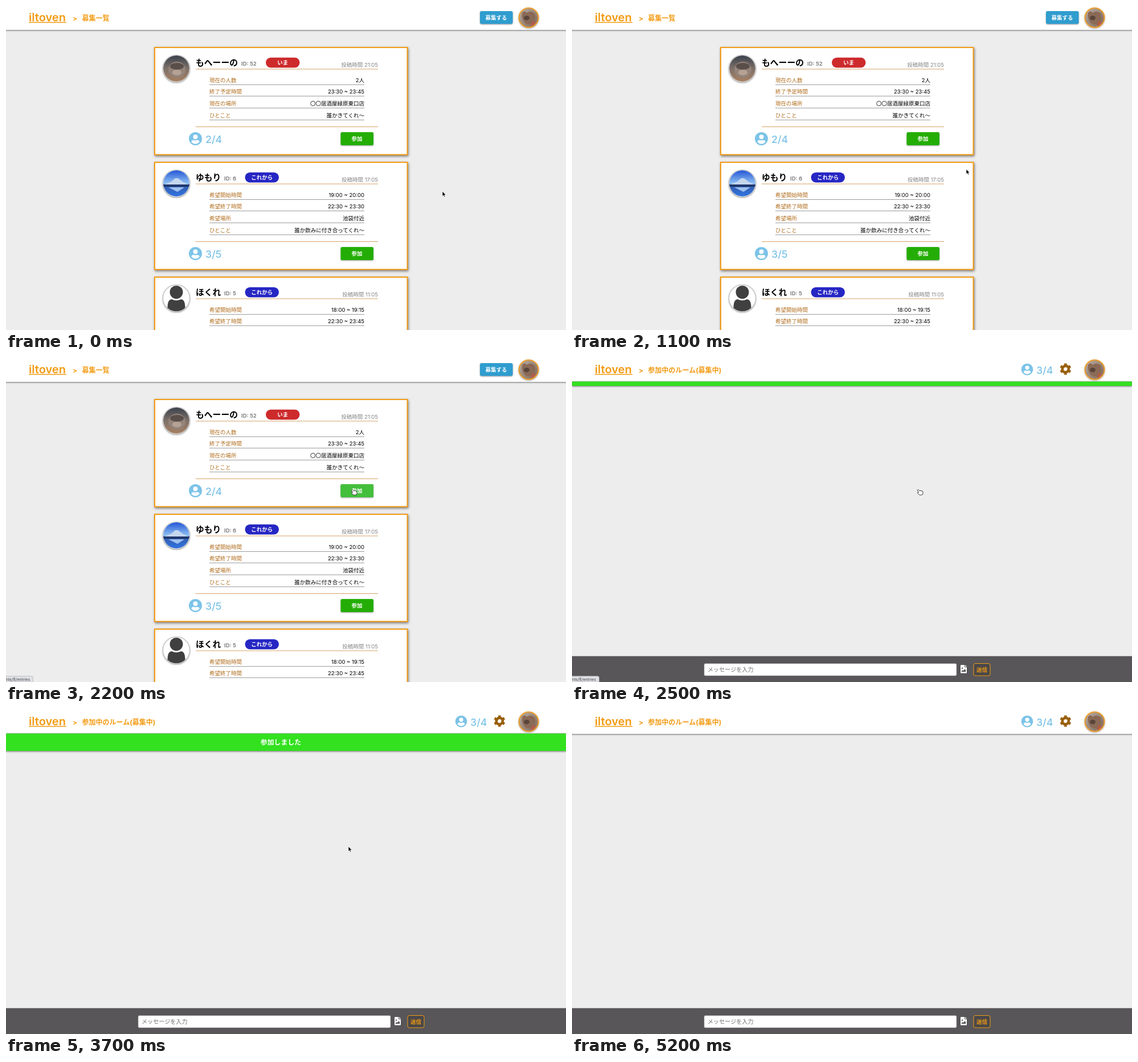
Write an HTML page that moves like this. It is 983 by 570 pixels and loops after 5300 ms.

```html
<!DOCTYPE html>
<html lang="ja">
<head>
<meta charset="utf-8">
<title>募集一覧</title>
<style>
  html, body { margin: 0; width: 100%; height: 100%; overflow: hidden; background: #ededed; }
  svg { position: absolute; left: 0; top: 0; display: block; }
  svg, .flash { font: 9.5px Inter, "Noto Sans CJK JP", sans-serif; }
  .list, .room, .flash, .hover, .status, .arrow, .hand, .cursor { animation: 5.3s step-end infinite; }

  .b { font-weight: 700; }
  .mid { text-anchor: middle; }
  .end { text-anchor: end; }
  .white { fill: #fff; }
  .title { font-size: 12px; font-weight: 700; fill: #f39b13; }
  .logo { font-size: 20px; font-weight: 600; fill: #f39b13; }
  .name { font-size: 14.8px; font-weight: 700; }
  .count { font-size: 17.8px; font-weight: 500; fill: #7cc3e8; }
  .label { font-weight: 500; fill: #b06c1c; }
  .gray { fill: #858585; }
  .rule { stroke: #d6a268; }
  .row { stroke: #9c9c9c; }
  .frame { fill: #fff; stroke: #f39b13; stroke-width: 2; filter: drop-shadow(1px 2px 2px rgba(0,0,0,.5)); }
  .btn { filter: drop-shadow(0 1px 1px rgba(0,0,0,.4)); }
  .go { fill: #24ad06; }
  .bar { fill: #fff; filter: drop-shadow(0 1px 1.5px rgba(0,0,0,.55)); }

  .flash {
    position: absolute; left: 0; top: 41px; width: 983px; overflow: hidden;
    border-top: 1px dotted #999; background: #33e11f; box-shadow: 0 1px 3px rgba(0,0,0,.55);
    color: #fff; font-size: 11.9px; font-weight: 700; line-height: 30px; text-align: center;
    text-indent: -18px; animation-name: flash;
  }
  .list { animation-name: list; }
  .room { animation-name: room; }
  .hover, .status, .hand { animation-name: over; }
  .arrow { animation-name: away; }
  .cursor { animation-name: move; }

  @keyframes list { 0% { visibility: visible } 45.28%, 100% { visibility: hidden } }
  @keyframes room { 0% { visibility: hidden } 45.28%, 100% { visibility: visible } }
  @keyframes over { 0% { opacity: 0 } 35.84% { opacity: 1 } 52.83%, 100% { opacity: 0 } }
  @keyframes away { 0% { opacity: 1 } 35.84% { opacity: 0 } 52.83%, 100% { opacity: 1 } }
  @keyframes flash {
    0% { height: 0; visibility: hidden }
    47.16% { height: 7px; visibility: visible }
    49.05% { height: 18.5px }
    50.94% { height: 27.8px }
    52.83% { height: 30px }
    83.01% { height: 27.1px }
    84.9% { height: 18px }
    86.79% { height: 6.2px; visibility: visible }
    88.67%, 100% { height: 0; visibility: hidden }
  }
  @keyframes move {
    0% { transform: translate(766px, 326px); animation-timing-function: steps(11) }
    20.75% { transform: translate(692px, 287px); animation-timing-function: steps(9) }
    37.73% { transform: translate(611px, 235px) }
    52.83% { transform: translate(611px, 235px); animation-timing-function: steps(9) }
    69.81% { transform: translate(601px, 240px); animation-timing-function: steps(5) }
    79.24% { transform: translate(572px, 157px); animation-timing-function: steps(3) }
    84.9% { transform: translate(550px, 109px); animation-timing-function: steps(4) }
    92.45%, 100% { transform: translate(522px, -16px) }
  }
</style>
</head>
<body>
<svg width="983" height="570">
  <defs>
    <clipPath id="disc"><circle r="23"/></clipPath>
    <linearGradient id="sky" x2="0" y2="1">
      <stop offset="0" stop-color="#2456d6"/><stop offset=".5" stop-color="#8fc0f2"/>
      <stop offset=".62" stop-color="#3560b0"/><stop offset="1" stop-color="#2f74e4"/>
    </linearGradient>
    <linearGradient id="fur" x2="0" y2="1">
      <stop offset="0" stop-color="#3a414c"/><stop offset=".5" stop-color="#7d7069"/>
      <stop offset="1" stop-color="#a98162"/>
    </linearGradient>
    <linearGradient id="tan" x2="1" y2="1">
      <stop offset="0" stop-color="#b9ada4"/><stop offset="1" stop-color="#7d6658"/>
    </linearGradient>
    <g id="person">
      <circle r="11.5" fill="#7cc3e8"/>
      <circle cy="-3.2" r="4" fill="#fff"/>
      <path d="M-7.2 5.6Q-6.6 2.2-3 2.2Q0 3.6 3 2.2Q6.6 2.2 7.2 5.6A9.2 9.2 0 0 1-7.2 5.6Z" fill="#fff"/>
    </g>
    <g id="owl" clip-path="url(#disc)">
      <circle r="23" fill="url(#fur)"/>
      <ellipse cx="1" cy="2" rx="15" ry="14" fill="#948379"/>
      <ellipse cx="1" cy="-4" rx="12" ry="6" fill="#594e4a"/>
      <ellipse cx="1" cy="7" rx="8" ry="5" fill="#b5a294"/>
    </g>
    <g id="lake" clip-path="url(#disc)">
      <circle r="23" fill="url(#sky)"/>
      <path d="M-23 3L-9-3L-2-9L3-9L12-2L23 3Z" fill="#c5d6ee"/>
      <path d="M-23 2H23V6H-23Z" fill="#21386e"/>
      <path d="M-14 7H14L2 15Z" fill="#9fc1ef"/>
    </g>
    <g id="blank" fill="#404040">
      <circle cy="-10.5" r="11.5"/>
      <path d="M-15.5 17Q-15.5 2-8 2Q0 6 8 2Q15.5 2 15.5 17Q9 23 0 23T-15.5 17Z"/>
    </g>
  </defs>

  <g class="list" id="list"></g>

  <rect class="bar" x="-5" y="-5" width="993" height="47"/>
  <text class="logo" x="40" y="26.5">iltoven</text>
  <path d="M40 28.7H106" stroke="#f39b13" stroke-width="1.5"/>
  <text class="title" x="117" y="26">&gt;</text>
  <g class="btn">
    <circle cx="917.5" cy="20.5" r="17" fill="url(#tan)" stroke="#f0a02c" stroke-width="2"/>
  </g>
  <path d="M906 12Q910 7 914 12Q921 7 928 13Q932 22 926 30Q916 35 910 29Q904 22 906 12Z" fill="#8a6a56"/>
  <ellipse cx="914" cy="21" rx="5" ry="4" fill="#59453b"/>
  <path d="M924 27l6 1l-4 6l-5 1z" fill="#b65a48"/>

  <g class="list">
    <text class="title" x="133.5" y="26">募集一覧</text>
    <rect class="btn" x="832" y="9" width="57.5" height="22.5" rx="3" fill="#2f9dcf"/>
    <text class="b mid white" x="860.5" y="23.6">募集する</text>
  </g>

  <g class="room">
    <text class="title" x="133.5" y="26">参加中のルーム(募集中)</text>
    <use href="#person" transform="translate(799 20) scale(.9)"/>
    <text class="count" x="815" y="28">3/4</text>
    <g fill="none" stroke="#995e06" transform="translate(866.3 19.5) rotate(15)">
      <circle r="5.6" stroke-width="4.6"/>
      <circle r="8.5" stroke-width="3.2" pathLength="12" stroke-dasharray="1 1"/>
    </g>
    <rect y="524.5" width="983" height="45.5" fill="#585658"/>
    <rect x="232" y="537.5" width="443" height="21.5" rx="2" fill="#fff" stroke="#8a8a8a" stroke-width=".6"/>
    <text class="gray" x="238" y="551.5" font-size="10.1" style="fill:#6f6f6f">メッセージを入力</text>
    <path d="M683 540H689V544H693V553.5Q693 554.5 692 554.5H683Q682 554.5 682 553.5V541Q682 540 683 540Z" class="white"/>
    <path d="M690 540L693 543H690Z" class="white"/>
    <circle cx="685" cy="545.8" r="1.2" fill="#585658"/>
    <path d="M683.8 552V550.5L685.4 549L686.6 550.2L689.4 547.2L691.2 549V552Z" fill="#585658"/>
    <rect x="705" y="537.5" width="29" height="21.5" rx="3" fill="#4a4849" stroke="#f39b13"/>
    <text class="b mid" x="719.5" y="552" fill="#f39b13">送信</text>
  </g>

  <g class="status">
    <path d="M0 559.8H45Q47.5 559.8 47.5 562.5V570H0Z" fill="#dfe1e6" stroke="#b4b6ba" stroke-width=".8"/>
    <text x="0" y="568" font-size="7" fill="#444">nts/8/entries</text>
  </g>
</svg>

<div class="flash">参加しました</div>

<svg width="983" height="570">
  <g class="cursor">
    <path class="arrow" d="M0 0V8.8L2 7L3.3 10L4.8 9.4L3.5 6.5H6.2Z" stroke="#fff" stroke-width=".7"/>
    <path class="hand" d="M-4.5-3Q-3.6-4-2.6-3L-1-1.4Q0-2.2 1-1.4Q2-2 3-1Q4.8-1.2 5 1V3.4Q4.6 6 2.4 6H-.4Q-2 5.6-4.6 2.4Q-4.8 1-3.2 1.4L-2.4 1.6L-4.4-1.8Q-5-2.6-4.5-3Z" fill="#fff" stroke="#222" stroke-width=".9"/>
  </g>
</svg>

<script>
  const soon = ['希望開始時間', '希望終了時間', '希望場所', 'ひとこと'];
  const cards = [
    { name: 'もへーーの', id: 52, idX: 413, tag: 'いま', tagX: 456, color: '#cd2a2c', posted: '21:05', pic: 'owl', count: '2/4',
      labels: ['現在の人数', '終了予定時間', '現在の場所', 'ひとこと'],
      values: ['2人', '23:30 ~ 23:45', '〇〇居酒屋緑原東口店', '誰かきてくれ〜'] },
    { name: 'ゆもり', id: 6, idX: 383, tag: 'これから', tagX: 419.5, color: '#2626c4', posted: '17:05', pic: 'lake', count: '3/5',
      labels: soon, values: ['19:00 ~ 20:00', '22:30 ~ 23:30', '池袋付近', '誰か飲みに付き合ってくれ〜'] },
    { name: 'ほくれ', id: 5, idX: 383, tag: 'これから', tagX: 419.5, color: '#2626c4', posted: '11:05', pic: 'blank', count: '',
      labels: soon.slice(0, 2), values: ['18:00 ~ 19:15', '22:30 ~ 23:45'] }
  ];

  const text = (cls, x, y, s) => `<text class="${cls}" x="${x}" y="${y}">${s}</text>`;
  const line = (cls, x1, x2, y) => `<path class="${cls}" d="M${x1} ${y}H${x2}"/>`;

  const row = (label, value, i) => {
    const y = 133.6 + i * 20.75;
    return text('label', 357, y, label) + text('end', 629, y, value) +
      line('row', 357, 629, Math.round(y + 4) + .5);
  };

  const card = (c, i) => `<g transform="translate(0 ${i * 202})">
    <rect class="frame" x="261" y="73" width="443.5" height="188.5"/>
    <circle class="btn" cx="299" cy="110" r="23.5" fill="#fff" stroke="#ccc" stroke-width="1.5"/>
    <use href="#${c.pic}" x="299" y="110"/>
    ${text('name', 333, 104.6, c.name)}
    ${text('b gray', c.idX, 104.8, 'ID: ' + c.id)}
    <rect x="${c.tagX}" y="90.7" width="59.5" height="17.8" rx="8.9" fill="${c.color}"/>
    ${text('b mid white', c.tagX + 29.7, 103.1, c.tag)}
    ${text('gray end', 653, 107.4, '投稿時間 ' + c.posted)}
    ${line('rule', 333, 653, 111)}
    ${c.labels.map((l, k) => row(l, c.values[k], k)).join('')}
    ${line('rule', 333, 653, 212.5)}
    <use href="#person" x="332.5" y="233.5"/>
    ${text('count', 350, 241.3, c.count)}
    <rect class="btn go" x="587.5" y="222" width="57.5" height="23" rx="2.5"/>
    ${i ? '' : '<rect class="hover" x="587.5" y="222" width="57.5" height="23" rx="2.5" fill="#43bf3c"/>'}
    ${text('b mid white', 616, 237.1, '参加')}
  </g>`;

  document.getElementById('list').innerHTML = cards.map(card).join('');
</script>
</body>
</html>
```
